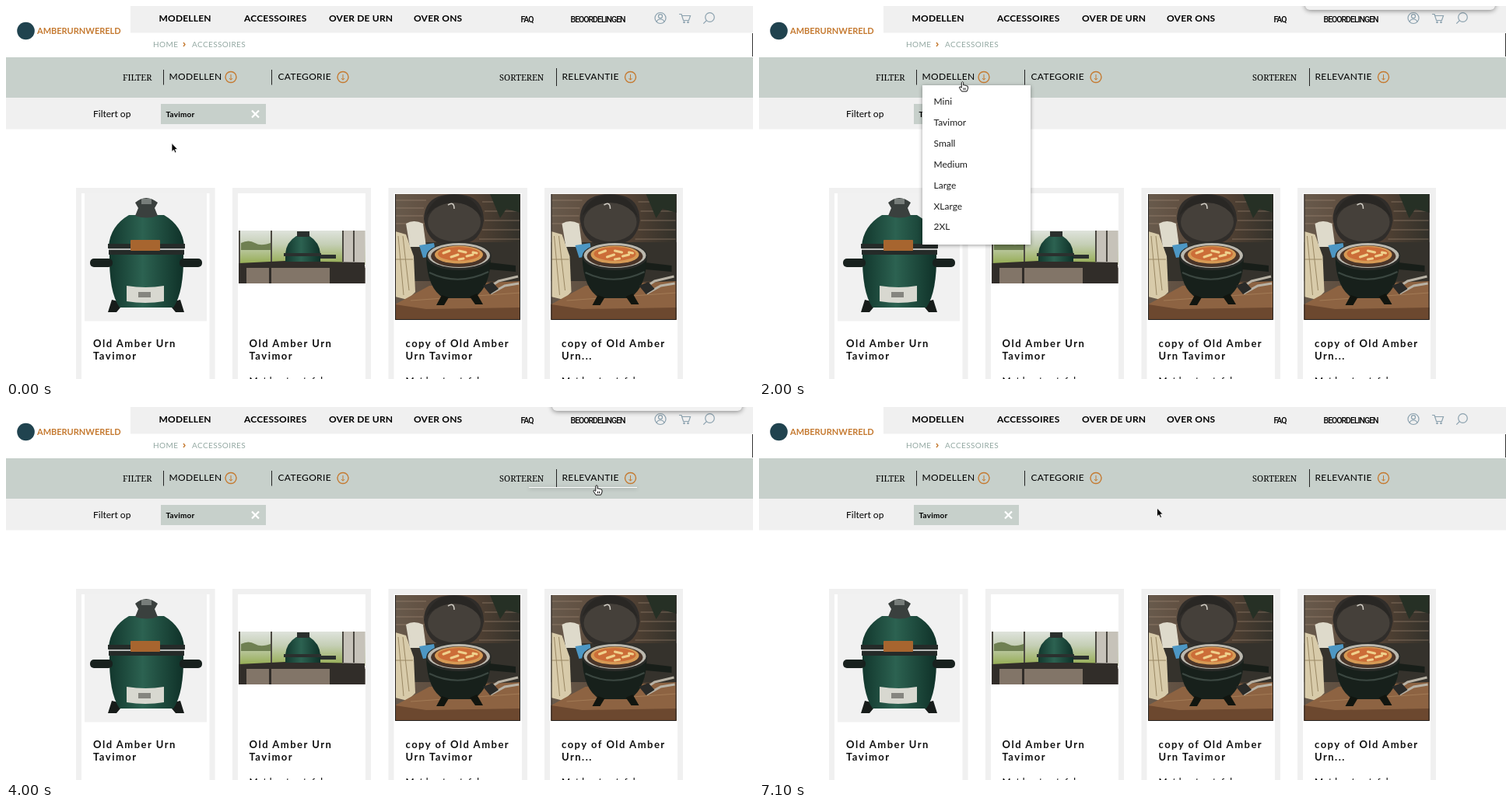
Recreate the animation shown at these times as an HTML page. Size 960 by 480 pixels, loop 7200 ms.

```html
<!DOCTYPE html>
<html lang="nl">
<head>
<meta charset="utf-8">
<title>Accessoires</title>
<style>
  html, body { margin: 0; width: 100%; height: 100%; overflow: hidden; background: #fff; }
  #stage { position: relative; width: 960px; height: 480px; overflow: hidden; font: 12px Lato, sans-serif; color: #1d1d1d; }
  svg { position: absolute; left: 0; top: 0; overflow: visible; }
  .nav { font-weight: 700; letter-spacing: .2px; fill: #000; }
  .side { font: 500 10.5px Roboto, sans-serif; font-stretch: condensed; letter-spacing: -1px; word-spacing: 0; }
  .crumb { font-size: 10px; letter-spacing: .4px; fill: #93a8a2; }
  .label { font: 300 11px "Noto Serif", serif; }
  .pick { letter-spacing: .35px; }
  .name { font-size: 13px; font-weight: 700; letter-spacing: 1.5px; fill: #111; }
  .intro { letter-spacing: .4px; }
  .menu { position: absolute; width: 139px; overflow: hidden; background: #fff; box-shadow: 0 1px 5px #0006; }
  .menu div { line-height: 26.9px; padding-left: 14.5px; white-space: nowrap; }
  .menu div:first-child { margin-top: 8.5px; }
  #notice { position: absolute; left: 702px; top: -40px; width: 244px; height: 45px; border-radius: 6px; background: #f1f1f1; box-shadow: 0 1px 6px #0007; }
</style>
</head>
<body>
<div id="stage">
<svg width="960" height="480">
  <defs>
    <linearGradient id="dome" x2="1">
      <stop stop-color="#12372d"/><stop offset=".45" stop-color="#2c6251"/><stop offset="1" stop-color="#0f3128"/>
    </linearGradient>
    <linearGradient id="garden" x2="0" y2="1">
      <stop stop-color="#dfe3dc"/><stop offset=".4" stop-color="#c5cfb6"/><stop offset="1" stop-color="#93ab4e"/>
    </linearGradient>
    <linearGradient id="wall" x2="1">
      <stop stop-color="#685a4c"/><stop offset=".55" stop-color="#594536"/><stop offset="1" stop-color="#33312a"/>
    </linearGradient>
    <g id="arrow" fill="none" stroke="#c57a31" stroke-width="1.4">
      <circle r="7"/><path d="M0-3.5V3.5M-2 1.5L0 3.7 2 1.5" stroke-width="1"/>
    </g>
    <g id="patio">
      <path fill="url(#wall)" d="M0 0h161v162H0z"/>
      <path d="M0 8h40M0 18h37M0 28h36M0 38h38M112 10h49M115 22h46M115 34h46M112 46h49M108 58h53" stroke="#a18b76" stroke-opacity=".4" stroke-width="1.5"/>
      <path fill="#263025" d="M122 0h39v24l-18-5-8 12z"/>
      <path fill="#35322c" d="M0 62h161v50H0z"/>
      <path fill="#d8cbaa" d="M0 48l14 4 10 28 2 46-10 10-16-4z"/>
      <path d="M4 54l7 76M10 54l8 70M1 84h22" stroke="#9a8864" fill="none"/>
      <path fill="#dedacb" d="M14 38q10-6 22 0l4 30H19z"/>
      <path fill="#4d97c4" d="M31 66l19-3 3 16-17 3z"/>
      <path fill="#8d6342" d="M0 142l44-24 117-6v50H0z"/>
      <path fill="#6c482f" d="M0 142l40 6 121-2v16H0z"/>
      <path d="M20 137l141-10" stroke="#b18a63" stroke-opacity=".6"/>
      <path fill="#302d2a" d="M37 32Q38 0 76 0t38 34q-4 28-27 30H58Q40 58 37 32z"/>
      <ellipse cx="76" cy="36" rx="34" ry="25" fill="#45403a"/>
      <path fill="#292724" d="M40 28Q48 1 76 1t36 30q-14-20-36-20T40 28z"/>
      <path d="M68 14q8-5 8 5" fill="none" stroke="#d0ccc4" stroke-width="1.5"/>
      <path fill="#17201b" d="M40 80q1 42 23 54h38q22-14 22-54z"/>
      <path d="M44 101q37 18 76-1" stroke="#3b4741" fill="none" stroke-width="2"/>
      <path fill="#11150f" d="M60 130l-7 13h10l6-10zM96 132l7 10h10l-8-14z"/>
      <ellipse cx="82" cy="80" rx="42" ry="18" fill="#292b28"/>
      <ellipse cx="82" cy="79" rx="40" ry="16" fill="#bbb8ae"/>
      <ellipse cx="82" cy="80" rx="36" ry="14" fill="#4a3529"/>
      <ellipse cx="82" cy="78" rx="31" ry="11.5" fill="#d69a55"/>
      <ellipse cx="82" cy="77" rx="27" ry="9" fill="#cc6d38"/>
      <path d="M62 76l8-3M72 81l9-3M82 73l9 2M92 80l8-2M100 75l5 1M82 84l6-1" stroke="#efd08c" stroke-width="3" stroke-linecap="round"/>
      <path fill="#181e19" d="M121 88l34 4v8l-34-3z"/>
      <path d="M118 122l15-10 25-6M123 128l18-10 18-3" stroke="#b8b2a5" stroke-width="3" fill="none"/>
      <path fill="#292a28" d="M113 118l12-5 8 9-11 7z"/>
      <path d="M.5 0v161.5h160V0" fill="none" stroke="#24211e"/>
    </g>
  </defs>

  <path fill="#f0f0f0" d="M160 0h800v34.5H160zM0 118h960v40.5H0z"/>
  <path fill="#c7d0cb" d="M0 66h960v52H0zM199 126h135v26H199z"/>
  <path fill="#333" d="M959 35h1v30h-1z"/>

  <circle cx="25.5" cy="32" r="11.3" fill="#20434f"/>
  <text x="40" y="36" font-size="11" font-weight="700" fill="#c57a31">AMBERURNWERELD</text>
  <g class="nav">
    <text x="196.5" y="19.7">MODELLEN</text><text x="306" y="20">ACCESSOIRES</text>
    <text x="415" y="20">OVER DE URN</text><text x="524" y="20">OVER ONS</text>
  </g>
  <g class="side"><text x="661.5" y="21">FAQ</text><text x="725.5" y="21">BEOORDELINGEN</text></g>
  <g fill="none" stroke="#8ba1ae" stroke-width="1.2">
    <circle cx="841" cy="15.5" r="7"/><circle cx="841" cy="13.2" r="2.5"/><path d="M836 20.5q1-3.5 5-3.5t5 3.5"/>
    <path d="M865 10.5h3l2.5 8h7l2-6H869"/><circle cx="871.5" cy="20.8" r=".8"/><circle cx="876.5" cy="20.8" r=".8"/>
    <circle cx="904.5" cy="14.5" r="5.8"/><path d="M900.3 18.7l-4 4"/>
  </g>
  <g class="crumb"><text x="189" y="53.2">HOME</text><text x="239" y="53.2">ACCESSOIRES</text></g>
  <path d="M228 47l2 2.5-2 2.5" fill="none" stroke="#c57a31" stroke-width="1.4"/>

  <g class="label"><text x="150" y="95.7">FILTER</text><text x="634" y="95.7">SORTEREN</text></g>
  <path d="M202.5 82v19.5M341.5 82v19.5M707.5 80v23" stroke="#222"/>
  <g class="pick">
    <text x="209.5" y="95.3">MODELLEN</text><text x="349.5" y="95.3">CATEGORIE</text><text x="714.5" y="95.3">RELEVANTIE</text>
  </g>
  <use href="#arrow" x="289" y="91.5"/><use href="#arrow" x="433" y="91.5"/><use href="#arrow" x="802.5" y="91.5"/>
  <text x="112" y="142.5">Filtert op</text>
  <text x="205.5" y="142.5" font-size="10" font-weight="700" letter-spacing=".2">Tavimor</text>
  <path d="M316 134.5l9 9m0-9l-9 9" stroke="#fff" stroke-width="2.2"/>

  <path fill="none" stroke="#f0f0f0" stroke-width="7" d="M93.5 490V237.500h171.500V490M294.500 490V237.500h171V490M495 490V237.500h171.500V490M695.500 490V237.500h171V490"/>

  <!-- first product -->
  <path fill="#f1f1f1" d="M101 241h157v164.500H101z"/>
  <path fill="#171c1a" d="M136 378l-5 16h11l10-12zM224 378l5 16h-11l-10-12z"/>
  <path fill="url(#dome)" d="M133 318q-1 50 13 70h69q14-20 13-70z"/>
  <path fill="url(#dome)" d="M132 309q2-26 26-40h45q24 14 26 40z"/>
  <path fill="#3a403e" d="M166 253q14-12 29 0l-4 7 4 10q-14 5-29 0l4-10z"/>
  <path fill="#777d7a" d="M174 248h13v7h-13z"/>
  <path fill="#252b29" d="M131 306h99v6h-99zM132 314h97v6h-97z"/>
  <path d="M132 313h97" stroke="#a7aaa7" stroke-width="1.4"/>
  <rect x="160" y="301" width="38" height="14" rx="1" fill="#a7652f"/>
  <rect x="108" y="325" width="29" height="11" rx="5" fill="#18211e"/>
  <rect x="223" y="325" width="29" height="11" rx="5" fill="#18211e"/>
  <path fill="#d8d8d0" d="M155 360q25 4 48 0v20q-24 4-48 0z"/>
  <path fill="#85857f" d="M170 368h16v7h-16z"/>

  <!-- second product -->
  <path fill="url(#garden)" d="M299 289h162.500v44H299z"/>
  <path fill="#c6c2b9" d="M433 289h28.500v44H433z"/>
  <path fill="#6f8052" d="M302 305q10-5 18 0t22-1v10h-40z"/>
  <path d="M300 289v43M341 289v42M433 289v40M447 289v40" stroke="#4b4841" stroke-width="2"/>
  <path fill="#827568" d="M299 335h162.500v22H299z"/>
  <path fill="#312d29" d="M299 331l60-3 102 2v7H299zM338 337h3v20h-3zM416 337h45.500v20H416zM299 337h10v20h-10z"/>
  <path fill="url(#dome)" d="M359 319q1-15 14-23h17q13 8 14 23v10h-45z"/>
  <path fill="#2b302e" d="M374 290h16v7h-16zM357 318h48v4h-48zM404 320h20v5h-20z"/>

  <use href="#patio" x="500" y="242"/><use href="#patio" x="700.500" y="242"/>
  <g class="name">
    <text x="112" y="438.700">Old Amber Urn</text><text x="112" y="454.500">Tavimor</text>
    <text x="312.500" y="438.700">Old Amber Urn</text><text x="312.500" y="454.500">Tavimor</text>
    <text x="513.500" y="438.700">copy of Old Amber</text><text x="513.500" y="454.500">Urn Tavimor</text>
    <text x="714" y="438.700">copy of Old Amber</text><text x="714" y="454.500">Urn...</text>
  </g>
  <g class="intro">
    <text x="312.500" y="486">Met houten tafel</text><text x="513.500" y="486">Met houten tafel</text><text x="714" y="486">Met houten tafel</text>
  </g>
</svg>
<div id="notice"></div>
</div>
<script>
const LOOP = 7200, STEP = 100;
const stage = document.getElementById('stage');
const notice = document.getElementById('notice');

const menus = [
  { x: 210, y: 101.5, open: 1215, close: 2100, items: ['Mini', 'Tavimor', 'Small', 'Medium', 'Large', 'XLarge', '2XL'] },
  { x: 349.5, y: 101.5, open: 2300, close: 3400, items: ['Urn accessoires', 'Urn onderdelen', 'Tafels',
    'Kruiden & Rookwaar', 'Kookboeken', 'Messen', 'Pannen', 'Kolen', 'Overig'] },
  { x: 671.5, y: 103, open: 3985, close: 5200, items: ['Relevantie', 'Naam: A tot Z', 'Naam: Z tot A',
    'Prijs: laag naar hoog', 'Prijs: hoog naar laag'] }
];
for (const menu of menus) {
  menu.box = document.createElement('div');
  menu.box.className = 'menu';
  menu.box.style.cssText = `left:${menu.x}px;top:${menu.y}px`;
  for (const item of menu.items) menu.box.appendChild(document.createElement('div')).textContent = item;
  menu.height = menu.items.length * 26.9 + 17;
  stage.appendChild(menu.box);
}

stage.insertAdjacentHTML('beforeend', `
  <svg id="cursor" width="1" height="1" stroke-linejoin="round">
    <path id="pointer" d="M0 0V11l2.500-2.300L4.200 12.500 6 11.700 4.400 8H7.700Z" fill="#000" stroke="#fff" stroke-width=".8"/>
    <path id="hand" d="M-1.200 1Q0-.8 1.200 1V4.500Q2.300 3.600 3.300 4.900 4.500 4.200 5.200 5.400 7 5 7 6.800V9L5.500 12.500H-1L-4 7.800Q-4 6-2.500 6.600L-1.200 7.700Z M1.500 8v2.500M3.500 8v2.500" fill="#fff" stroke="#111"/>
  </svg>`);
const cursor = document.getElementById('cursor');
const pointer = document.getElementById('pointer');
const hand = document.getElementById('hand');

// time, x, y of the cursor's hot spot
const path = [[0, 213, 176.500], [500, 213, 176.500], [1100, 249, 101], [1900, 249, 98], [2400, 380, 92],
  [3300, 380, 92], [3900, 759, 101], [4400, 759, 97], [5100, 759, 97], [5700, 511.500, 130], [LOOP, 511.500, 130]];

const progress = (t, start, length) => Math.min(1, Math.max(0, (t - start) / length));
const swing = p => .5 - Math.cos(p * Math.PI) / 2;

function cursorAt(t) {
  const i = path.findIndex(([time]) => time > t);
  const [t0, x0, y0] = path[i - 1], [t1, x1, y1] = path[i];
  const p = swing((t - t0) / (t1 - t0));
  return [x0 + (x1 - x0) * p, y0 + (y1 - y0) * p];
}

function draw(now) {
  const t = Math.floor(now % LOOP / STEP) * STEP;

  for (const { box, height, open, close } of menus) {
    const shown = swing(progress(t, open, 300)) * (1 - swing(progress(t, close, 200)));
    box.style.display = shown > 0 ? 'block' : 'none';
    box.style.height = shown * height + 'px';
  }

  const slideIn = 1 - (1 - progress(t, 1000, 750)) ** 3;
  const slideOut = swing(progress(t, 6500, 500));
  notice.style.transform = `translateX(${258 * (1 - slideIn) + 270 * slideOut}px)`;
  notice.style.visibility = t > 1000 && t < 7000 ? 'visible' : 'hidden';

  const [x, y] = cursorAt(t);
  const hovering = menus.some(menu => t >= menu.open - 150 && t < menu.close);
  cursor.style.transform = `translate(${x}px, ${y}px)`;
  pointer.style.display = hovering ? 'none' : '';
  hand.style.display = hovering ? '' : 'none';
}

const start = performance.now();
function tick() {
  draw(performance.now() - start);
  requestAnimationFrame(tick);
}
tick();
</script>
</body>
</html>
```
